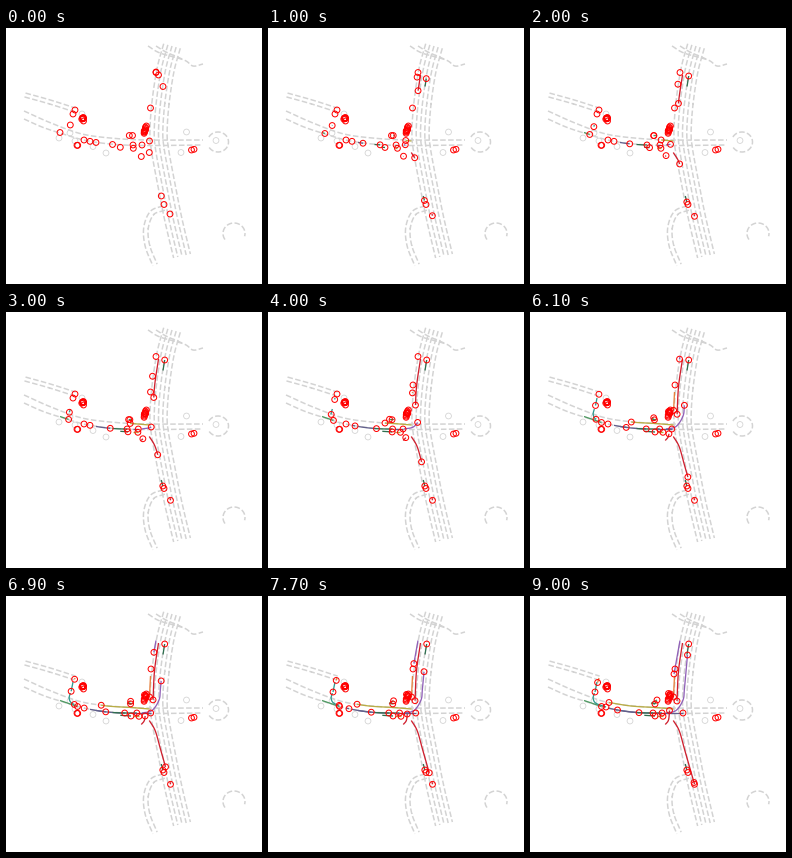
Recreate the animation shown at these times as a matplotlib script. Size 256 by 256 pixels, loop 9.1 s.

```python
import numpy as np
import matplotlib.pyplot as plt
from matplotlib.animation import FuncAnimation

SIZE, DPI, STEPS = 256, 64, 91
LAST = STEPS - 1
PX = 72 / DPI
ROAD = "#d3d3d3"
RED, ORANGE, GREEN, DARK = "#d01f2e", "#e8803a", "#4f9a63", "#2f6f4f"
PURPLE, DUSK, OLIVE, TEAL = "#9060b8", "#62608c", "#b9ad45", "#2f9a90"

rng = np.random.default_rng(4)
fig = plt.figure(figsize=(SIZE / DPI, SIZE / DPI), dpi=DPI, facecolor="white")
ax = fig.add_axes([0, 0, 1, 1])
ax.set(xlim=(0, SIZE), ylim=(SIZE, 0))
ax.axis("off")


def curve(*pts, n=20):
    """Catmull-Rom curve through a few points."""
    p = np.array(pts, float)
    p = np.vstack([2 * p[0] - p[1], p, 2 * p[-1] - p[-2]])
    s = np.linspace(0, 1, n)[:, None]
    return np.vstack([
        0.5 * (2 * b + (c - a) * s + (2 * a - 5 * b + 4 * c - d) * s ** 2
               + (3 * b - a - 3 * c + d) * s ** 3)
        for a, b, c, d in zip(p, p[1:], p[2:], p[3:])])


def road(line, offsets=(0,)):
    """Dashed lane edges, shifted sideways from a centre line."""
    dx, dy = np.gradient(line, axis=0).T
    normal = np.column_stack([-dy, dx]) / np.hypot(dx, dy)[:, None]
    for o in offsets:
        ax.plot(*(line + o * normal).T, color=ROAD, lw=1.5 * PX,
                ls=(0, (3.7, 1.6)), zorder=1)


road(curve((166, 18), (159.5, 42), (154.5, 75), (152.5, 104), (154, 122),
           (159.5, 152), (167, 190), (176, 228)), np.linspace(-8.6, 8.6, 5))
road(curve((19, 67), (44, 74), (69, 82)), (-2, 2))
road(curve((18, 83), (45, 95), (76, 106), (110, 110.5), (143, 112), (197, 112)))
road(curve((18, 91), (36, 99), (54, 105), (80, 112.5), (110, 116.5), (143, 117.5),
           (196, 117)))
road(curve((158, 180), (146, 185), (140, 200), (141.5, 218), (149, 237)), (-2.3, 2.3))
road(curve((142, 18), (154, 25), (178, 32), (187, 38), (197, 36)))
road(curve((150, 18), (160, 24), (176, 31)))

# Turning circles
a = np.radians(np.linspace(-150, 150, 40))
road(np.column_stack([212 + 10.5 * np.cos(a), 114 + 10 * np.sin(a)]))
a = np.radians(np.linspace(145, 375, 40))
road(np.column_stack([228 + 11 * np.cos(a), 205.5 + 10.5 * np.sin(a)]))


def depart(p):
    return lambda u: u ** p


def brake(p):
    return lambda u: 1 - (1 - u) ** p


def settle(u):
    return u * u * (3 - 2 * u)


steady = depart(1)
agents = []


def drive(hue, line, ease=steady, start=0, end=LAST):
    """Follow a line by distance; the ease sets the speed."""
    u = np.clip((np.arange(STEPS) - start) / (end - start), 0, 1)
    gone = np.r_[0, np.cumsum(np.hypot(*np.diff(line, axis=0).T))]
    at = ease(u) * gone[-1]
    agents.append((hue, np.column_stack([np.interp(at, gone, c) for c in line.T])))


def park(x, y):
    agents.append((None, np.tile([x, y], (STEPS, 1))))


def eastbound(x0, x1):
    x = np.linspace(x0, x1, 30)
    return np.column_stack([x, 117 - 5 * (np.clip(120 - x, 0, None) / 42) ** 2])


# North approach
drive(RED, curve((152.5, 47), (148.5, 75), (147, 105)), brake(2.7))
drive(None, curve((150, 44), (145, 73)), depart(1.25), end=40)
drive(PURPLE, curve((150, 44.5), (144, 78)), settle, start=55)
drive(ORANGE, curve((144.5, 80), (143.5, 101)), settle, start=36, end=68)
drive(DARK, curve((157, 58.5), (158.7, 48)), brake(2), end=20)

# Through the crossing and leaving south
drive(PURPLE, curve((136, 117), (146, 114.5), (153, 104), (154.5, 92), (157.5, 59)),
      depart(1.8))
drive(RED, curve((143.3, 124.5), (149.3, 135), (155, 155), (164, 186.5)), depart(1.07))
drive(RED, curve((135.3, 128.5), (138.5, 124), (139.5, 114.5)), depart(1.7))
drive(DARK, curve((155.3, 168), (156.8, 174)), brake(2), end=20)
drive(RED, curve((164, 186), (164.5, 188.3)), brake(2), end=20)

# Westbound, then the eastbound queue from back to front
drive(OLIVE, curve((143.5, 113), (125, 111.5), (101, 110), (79, 106.5)), depart(1.1))
drive(DUSK, eastbound(78, 87.5), depart(1.3), start=68)
drive(DUSK, eastbound(84, 109), start=33)
drive(DUSK, eastbound(90, 123), brake(1.4))
drive(DARK, eastbound(106.5, 132), brake(2.1))
drive(DUSK, eastbound(127, 153), depart(1.45))
drive(DARK, curve((114.3, 119.3), (125, 120)), brake(1.15), end=45)
drive(OLIVE, curve((127.3, 120.3), (133, 120.3)), brake(4))

# West junction
drive(GREEN, curve((54, 104.5), (71.5, 110.5)), end=61)
drive(TEAL, curve((64.3, 97), (63.2, 102.5), (66, 107.3), (76, 111)), depart(1.7))
drive(TEAL, curve((67, 86), (65, 96)), settle, start=28, end=77)
drive(ORANGE, curve((69, 82), (67.6, 86.5)), depart(1.2), start=58)

# Walkers
drive(GREEN, curve((126.5, 107.5), (121.5, 107.3), (127, 104)))
drive(DARK, curve((123.3, 107.5), (125, 108)))
for f in np.linspace(0, 1, 3):
    drive(None, curve((138.3 + f, 104 - 2 * f), (138.5 + 2 * f, 97.5 + 3 * f)))

# Waiting vehicles and two tight groups
for x, y in [(71, 117.3), (71.7, 117.3), (185.5, 122), (188, 121.3), (158, 176.5)]:
    park(x, y)
for dx, dy in rng.uniform(-1, 1, (7, 2)):
    park(76 + 1.5 * dx, 90.5 + 1.1 * dy)
park(77.5, 93)
for f in np.linspace(0, 1, 7):
    park(139.9 - 2 * f + rng.uniform(-0.5, 0.5), 98 + 7.3 * f)

ring = dict(s=(5.8 * PX) ** 2, facecolors="none")
quiet = [(53, 110), (64, 105), (69, 113), (76, 86), (87, 118.5), (100, 125),
         (175, 124.5), (180.5, 104), (210, 112.5)]
ax.scatter(*zip(*quiet), edgecolors=ROAD, linewidths=0.8 * PX, zorder=2, **ring)

paths = np.array([path for _, path in agents])
trails = [(ax.plot([], [], color=hue, lw=1.3 * PX, zorder=3,
                   solid_capstyle="butt")[0], path) for hue, path in agents if hue]
dots = ax.scatter(*paths[:, 0].T, edgecolors="red", linewidths=PX, zorder=4, **ring)


def draw(i):
    for line, path in trails:
        line.set_data(*path[:i + 1].T)
    dots.set_offsets(paths[:, i])
    return [*(line for line, _ in trails), dots]


anim = FuncAnimation(fig, draw, frames=STEPS, interval=100, repeat=True,
                     repeat_delay=0, blit=False)
plt.show()
```
